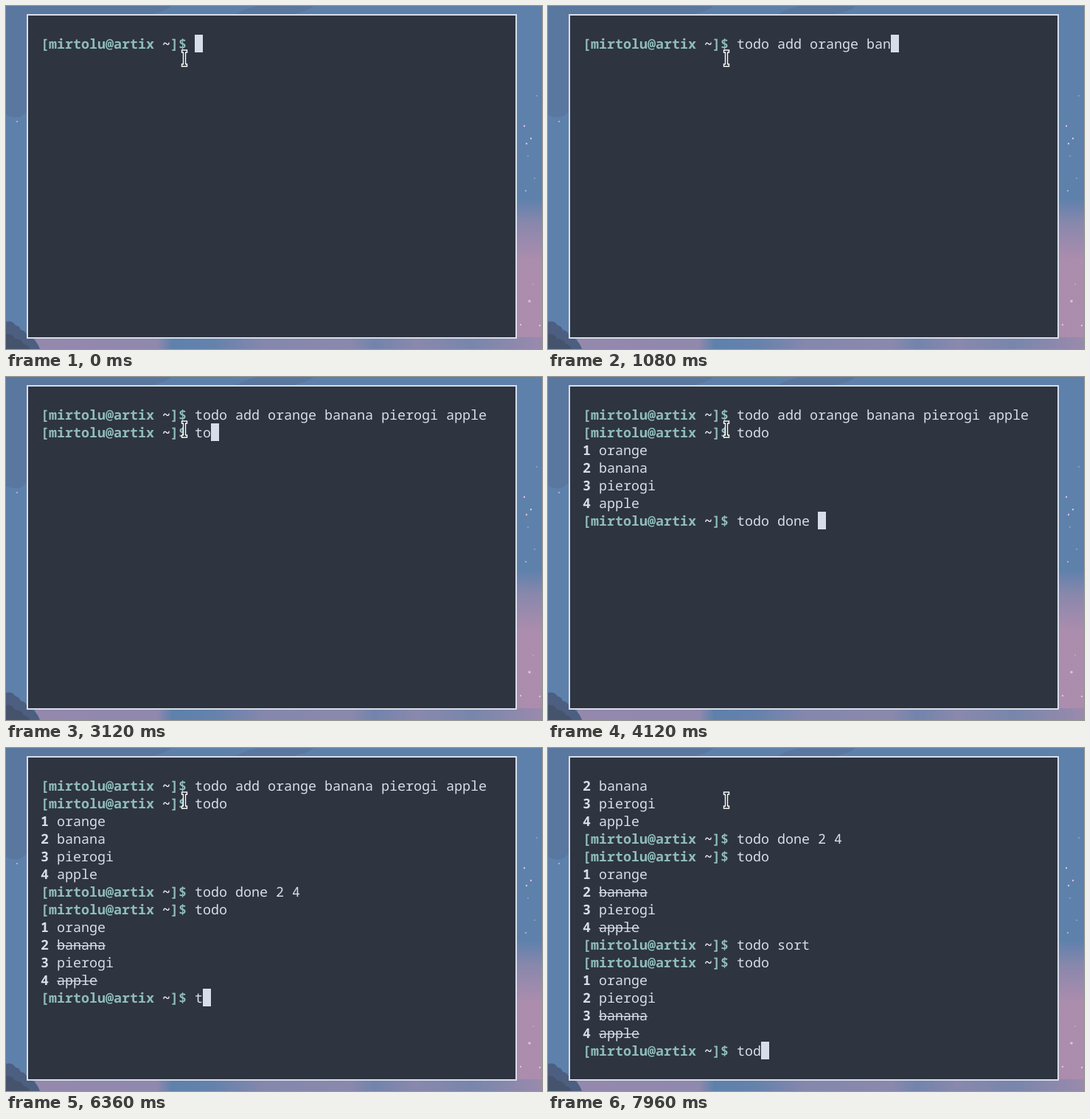
Recreate the animation shown at these times as an HTML page. Size 727x466 px, loop 8000 ms.

```html
<!DOCTYPE html>
<html lang="en">
<head>
<meta charset="utf-8">
<title>Terminal todo list</title>
<style>
  html, body { margin: 0; width: 100%; height: 100%; overflow: hidden; background: #5e81ac; }
  svg { display: block; width: 727px; height: 466px; }
  text {
    font: 18.333px "Noto Sans Mono", "DejaVu Sans Mono", monospace;
    fill: #d8dee9;
    white-space: pre;
    text-rendering: geometricPrecision;
  }
  .bold { font-weight: 700; }
  .prompt { font-weight: 700; fill: #8fbcbb; }
  .home { font-weight: 700; fill: #eceff4; }
  .block { fill: #d8dee9; }
</style>
</head>
<body>
<svg viewBox="0 0 727 466">
  <defs>
    <linearGradient id="dusk" x1="0" y1="262" x2="0" y2="345" gradientUnits="userSpaceOnUse">
      <stop offset="0" stop-color="#b48ead" stop-opacity="0"/>
      <stop offset=".4" stop-color="#b48ead" stop-opacity=".5"/>
      <stop offset="1" stop-color="#b48ead" stop-opacity=".9"/>
    </linearGradient>
    <linearGradient id="haze" x1="40" y1="0" x2="727" y2="0" gradientUnits="userSpaceOnUse">
      <stop offset="0" stop-color="#9488ad"/>
      <stop offset=".24" stop-color="#9088ad"/>
      <stop offset=".27" stop-color="#5e81ac"/>
      <stop offset=".35" stop-color="#6482ac"/>
      <stop offset=".45" stop-color="#8587ad"/>
      <stop offset=".62" stop-color="#8a88ad"/>
      <stop offset=".67" stop-color="#7284ac"/>
      <stop offset=".75" stop-color="#8a88ad"/>
      <stop offset=".86" stop-color="#7886ac"/>
      <stop offset="1" stop-color="#9a8aad"/>
    </linearGradient>
  </defs>

  <!-- wallpaper -->
  <rect width="727" height="466" fill="#5e81ac"/>
  <path d="M0 0H225Q215 8 195 12H30V140Q20 158 0 148ZM310 12Q325 3 340 0H418Q408 8 385 12Z" fill="#5a789f"/>
  <path d="M690 262H727V466H690Z" fill="url(#dusk)"/>
  <path d="M40 450H727V466H40Z" fill="url(#haze)"/>
  <path d="M0 429Q9 427 13 434Q18 434 20 440Q28 441 29 450Q40 450 46 466H0Z" fill="#4c5f80"/>
  <path d="M0 446Q8 444 12 452Q22 453 24 459Q31 461 32 466H0Z" fill="#46536c"/>
  <g id="stars" fill="#dcc3da"></g>

  <!-- terminal -->
  <rect x="29" y="12" width="663" height="439" fill="#2e3440" stroke="#d8dee9" stroke-width="2"/>
  <g id="screen"></g>

  <!-- mouse pointer: dark beam with a white outline -->
  <g fill="none" stroke-linecap="square">
    <path id="beam" d="M240 61.5H244M242 61.5V80.5M240 80.5H244" stroke="#fff" stroke-width="4.4"/>
    <path d="M240 61.5H244M242 61.5V80.5M240 80.5H244" stroke="#1c1f26" stroke-width="1.6"/>
  </g>
</svg>

<script>
const LOOP = 8000, TICK = 40;
const LEFT = 47, TOP = 39, COL = 11, ROW = 24, ROWS = 16, BASE = 19;
const USER = '[mirtolu@artix ', PROMPT_COLS = 19;
const screenBox = document.getElementById('screen');

document.getElementById('stars').innerHTML = [
  [703, 163, 1.2], [712, 180, 1.2], [706, 187, 1.2], [708, 204, .7], [717, 234, .7],
  [705, 251, .9], [720, 122, .7], [15, 157, .9], [710, 401, 1.8], [698, 433, 1.2],
  [715, 378, .7], [724, 434, 1.2]
].map(([x, y, r]) => `<circle cx="${x}" cy="${y}" r="${r}"/>`).join('');

// n key times spread evenly from a to b, on the frame clock
const even = (a, b, n) => Array.from({ length: n },
  (_, i) => Math.round((a + (b - a) * i / (n - 1)) / TICK) * TICK);

const keys = [];
const type = (text, times) => [...text].forEach((key, i) => keys.push({ key, at: times[i] }));

type('todo add', even(120, 480, 8));
type(' orange ', even(480, 920, 8));
type('banana ', even(960, 1320, 7));
type('pierogi', even(1480, 1840, 7));
type(' ', [2280]);
type('apple', even(2320, 2600, 5));
type('\ntodo\n', [2920, 3040, 3120, 3160, 3200, 3280]);
type('todo done ', even(3560, 4120, 10));
type('2 ', [4240, 4280]);
type('4', [4480]);
type('\ntodo\n', even(4840, 5120, 6));
type('tod', even(6360, 6520, 3));
type('o sort\ntodo\n', even(6720, 7440, 12));
type('t', [7680]);
type('od', [7880, 7960]);

// Run one todo command; returns the updated list and the printed lines
function run(line, list) {
  const [, verb, ...args] = line.trim().split(' ');
  if (verb === 'add') return [[...list, ...args.map(name => ({ name, done: false }))], []];
  if (verb === 'done') {
    return [list.map((item, i) => args.includes(String(i + 1)) ? { ...item, done: true } : item), []];
  }
  if (verb === 'sort') return [[...list].sort((a, b) => a.done - b.done), []];
  return [list, list.map((item, i) => ({ ...item, num: i + 1 }))];
}

function replay(count) {
  let list = [], lines = [], input = '';
  for (const { key } of keys.slice(0, count)) {
    if (key !== '\n') { input += key; continue; }
    const [next, output] = run(input, list);
    list = next;
    lines.push({ input }, ...output);
    input = '';
  }
  lines.push({ input });
  return lines;
}

const put = (col, y, text, cls = '') =>
  `<text x="${LEFT + col * COL}" y="${y + BASE}" class="${cls}">${text}</text>`;

const block = (col, y, cols, height) =>
  `<rect class="block" x="${LEFT + col * COL}" y="${y}" width="${cols * COL}" height="${height}"/>`;

function drawLine(line, row) {
  const y = TOP + row * ROW;
  if (line.num) {
    const strike = line.done ? block(2, y + 13, line.name.length, 1.2) : '';
    return put(0, y, line.num, 'bold') + put(2, y, line.name) + strike;
  }
  return put(0, y, USER, 'prompt') + put(15, y, '~', 'home') + put(16, y, ']$', 'prompt') +
    put(PROMPT_COLS, y, line.input);
}

function draw(count) {
  const lines = replay(count).slice(-ROWS);
  const last = lines.length - 1;
  const col = PROMPT_COLS + lines[last].input.length;
  screenBox.innerHTML = lines.map(drawLine).join('') + block(col, TOP + last * ROW, 1, ROW);
}

let shown = -1;
function frame() {
  const t = performance.now() % LOOP;
  const count = keys.filter(k => k.at <= t).length;
  if (count !== shown) draw(shown = count);
  requestAnimationFrame(frame);
}
frame();
</script>
</body>
</html>
```
